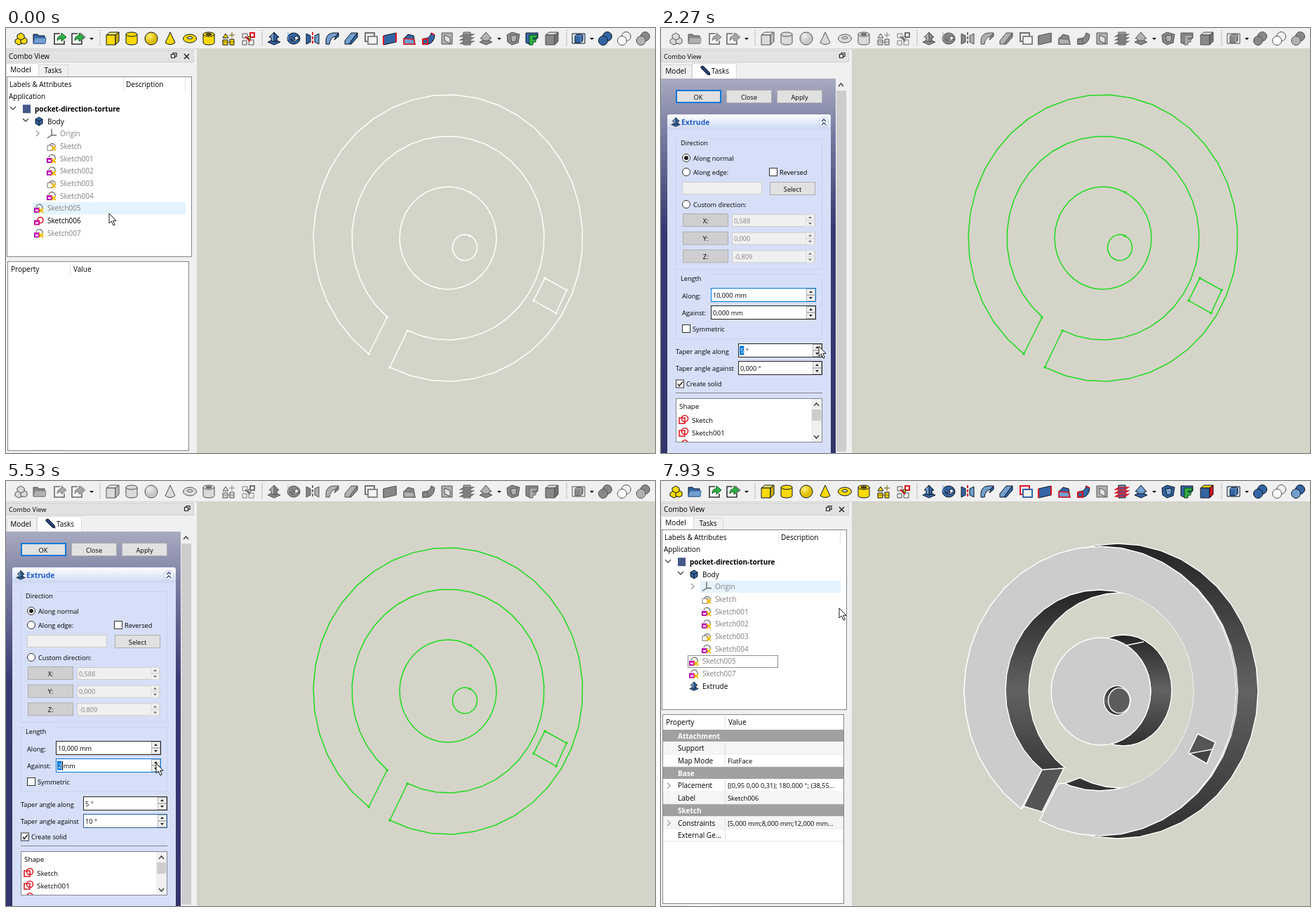
These frames come from a looping animation (925x605 px, 8 s). An HTML page:

```html
<!DOCTYPE html>
<html lang="en">
<head>
<meta charset="utf-8">
<title>Extrude a sketch</title>
<style>
html, body { margin: 0; width: 100%; height: 100%; overflow: hidden; background: #f0f0f0 }
svg { display: block; width: 925px; height: 605px; font: 10px "Open Sans", "Noto Sans", sans-serif }
#task { font-size: 9.2px }
.off, .idle .pick, .task .icon { filter: grayscale(1) opacity(.72) }
#task, #solid, .task #model, .idle #props, .done #sketch { display: none }
.task #task, .done #solid { display: inline }
#sketch { stroke: #1edb1e; fill: #1edb1e }
.idle #sketch { stroke: #fff; fill: #fff }
</style>
</head>
<body>
<script>
const INK = '#0b1521', BLUE = '#3465a4', SKY = '#729fcf', YELLOW = '#fcd909', RED = '#dd1520',
      GREEN = '#2fb344', GREY = '#808080', ACCENT = '#0078d7', VIEW = '#d5d4c8', TASK = '#d6dff7';

// Drawing helpers; all return SVG markup
const rect = (x, y, w, h, fill, line = 'none', extra = '') => {
  const o = line === 'none' ? 0 : .5;
  return `<rect x="${x + o}" y="${y + o}" width="${w - 2 * o}" height="${h - 2 * o}" fill="${fill}" stroke="${line}" ${extra}/>`;
};
const path = (d, fill = 'none', line = INK, extra = '') => `<path d="${d}" fill="${fill}" stroke="${line}" ${extra}/>`;
const oval = (x, y, rx, ry, fill = 'none', line = INK, extra = '') =>
  `<ellipse cx="${x}" cy="${y}" rx="${rx}" ry="${ry}" fill="${fill}" stroke="${line}" ${extra}/>`;
const text = (x, y, s, fill = '#000', extra = '') => `<text x="${x}" y="${y + 3.6}" fill="${fill}" ${extra}>${s}</text>`;
const at = (x, y, body, cls = '') => `<g transform="translate(${x} ${y})" class="${cls}">${body}</g>`;
const BOLD = 'font-weight="700"', MID = 'text-anchor="middle"';
const arc = (cx, cy, rx, ry, from = 0, to = 360, n = 40) => 'M' + Array.from({length: n + 1}, (_, i) => {
  const a = (from + (to - from) * i / n) * Math.PI / 180;
  return (cx + rx * Math.cos(a)).toFixed(1) + ' ' + (cy + ry * Math.sin(a)).toFixed(1);
}).join('L');

// Toolbar
const box = (top, front, side) => path('M-9-5L-4-9H9L4-5Z', top) + path('M-9-5H4V9H-9Z', front) + path('M4-5L9-9V4L4 9Z', side);
const tube = fill => path('M-8-6V6A8 3 0 0 0 8 6V-6', fill) + oval(0, -6, 8, 3, fill);
const slab = (y, fill) => path(`M-9 ${y}L0 ${y - 4}L9 ${y}L0 ${y + 4}Z`, fill);
const balls = (a, b) => oval(3, -3, 6.5, 6.5, b) + oval(-3, 3, 6.5, 6.5, a);
const share = path('M1-7H-7V8H7V3', '#fafafa', '#333', 'stroke-width="1.6"') +
  path('M-3 3Q-3-4 3-4V-8L10-2L3 4V0Q-1 0-3 3Z', GREEN, '#0c5a18');
const lift = slab(5, BLUE) + path('M-4 4V-2H-7L0-9L7-2H4V4Z', SKY) + path('M0-9L7-2H4V4H0Z', BLUE);
const drop = '<path d="M-3-1H3L0 2Z"/>';
const icons = [
  [21, path('M-8 2L-3-1L2 1V7L-3 9L-8 6Z', YELLOW) + path('M0 0L5-2L9 1V6L5 8L0 6Z', YELLOW) + path('M-5-5L0-8L5-5V0L0 2L-5-1Z', YELLOW)],
  [48, path('M-9-6H-3L-1-4H7V7H-9Z', BLUE) + path('M-7-1H9L8 7H-9Z', SKY, BLUE)],
  [76, share],
  [103, at(-2, 0, share) + path('M3-8L10-2L3 4', 'none', '#333')],
  [152, box('#fdf26a', YELLOW, '#cfae00')],
  [179, tube(YELLOW)],
  [207, oval(0, 0, 9, 9, 'url(#ball)')],
  [234, path('M0-9L-7 6Q0 11 7 6Z', YELLOW)],
  [262, oval(0, 0, 9.5, 6, YELLOW) + oval(0, -1, 4, 1.6, '#f0f0f0')],
  [289, tube(YELLOW) + oval(0, -6, 4, 1.2, '#6b5a00')],
  [317, path('M-8 9V2H-1V9ZM2 9V1H8V9ZM-8-1L-4-7L0-1Z', YELLOW) + path('M1-5H9M5-9V-1M-8 5H8', 'none', '#6b5a00')],
  [345, path('M-8-7H-1V-1H-8ZM1 2H8V9H1ZM-8 3H-2V9H-8Z', '#eee', '#555') + path('M3-8H9V-2H3ZM-4-3L3 4', 'none', RED, 'stroke-width="2"') + oval(2, -1, 2, 2, YELLOW)],
  [382, lift],
  [410, oval(0, 0, 9, 8, BLUE) + path('M-3-3A5 4 0 1 0 5 1L8 2L5-4L0-1L2 0A3 2 0 1 1-2-1Z', '#eef4fb') + path('M-8-9V2', 'none', SKY)],
  [437, path('M-9-7L-3-4V5L-9 8Z', BLUE) + path('M9-7L3-4V5L9 8Z', SKY) + path('M0-9V9', 'none', RED, 'stroke-width="2" stroke-dasharray="4 2"')],
  [465, path('M-9 8V2Q-8-7 1-8H9L5-3Q-3-2-4 8Z', SKY) + path('M5-3L9-8V-3L3 2Z', BLUE)],
  [492, path('M-9 8V3L0-8H9L5-3L-3 8Z', SKY) + path('M5-3L9-8V-2L0 8H-3Z', BLUE)],
  [520, path('M-8-8H5V4H-8Z', '#eee', RED, 'stroke-width="2"') + path('M-4-3H9V8H-4Z', '#f4f4f4', BLUE, 'stroke-width="2"'), 'pick'],
  [547, path('M-9-4L9-8V5L-9 9Z', BLUE) + path('M-9-4V9M9-8V5', 'none', RED, 'stroke-width="2"')],
  [575, path('M-8 8V0L-2-6L6-4L8 8Z', BLUE) + path('M-8 0L6 1L8 8H-8Z', SKY, RED, 'stroke-width="1.6"')],
  [602, path('M-8 8L-7 0Q2 1 4-8L9-5Q8 7-1 8Z', BLUE) + path('M-8 1H-1V8H-8ZM4-8L9-5', 'none', RED, 'stroke-width="2"')],
  [629, path('M-8-8H7V8H-8Z', SKY) + path('M-4-5L4-1V7L-4 3Z', '#ddd'), 'off'],
  [657, path('M-5-9H5V9H-5Z', SKY) + [-5, 0, 5].map(y => path(`M-9 ${y + 2}L-4 ${y - 1}H9L4 ${y + 2}Z`, BLUE, RED, 'stroke-width="1.5"')).join(''), 'pick'],
  [684, slab(5, BLUE) + path('M-5 3V0H-8L0-9L8 0H5V3Z', SKY), 'pick'],
  [723, path('M-9-5L-2-9L9-6L7 6L-2 9L-8 5Z', BLUE) + path('M-4-4L5-5L4 4L-2 5Z', SKY), 'pick'],
  [750, path('M-9-8H8V-1L-2 9L-9 6Z', BLUE) + path('M-4-5H7V-1H1V1H5V5H1V9H-4Z', GREEN, '#0a4214')],
  [778, box(YELLOW, BLUE, RED), 'pick'],
  [816, path('M-9-7H9V7H-9Z', '#dce8f5') + at(0, 0, path('M-5-4L-2-6H6V3L3 6H-5Z', BLUE) + path('M-5-4H3V6M3-4L6-6', 'none', SKY))],
  [854, balls(BLUE, BLUE)],
  [881, balls('#fff', '#eee'), 'off'],
  [908, balls(SKY, BLUE), 'pick'],
];
const toolbar = rect(0, 0, 925, 30, '#f0f0f0') + rect(0, 29, 925, 1, '#d0d0d0') + '<g id="hot"></g>' +
  [134, 365, 799].map(x => path(`M${x} 3V27`, 'none', '#aaa', 'stroke-dasharray="1 2" stroke-width="2"')).join('') +
  icons.map(([x, body, cls = '']) => at(x, 15, body, 'icon ' + cls)).join('') +
  [122, 703, 835].map(x => at(x, 15, drop)).join('');

// Model panel
const chevron = (x, y, open) => path(open ? `M${x - 4} ${y - 2}l4 4l4-4` : `M${x - 2} ${y - 4}l4 4l-4 4`, 'none', open ? '#444' : '#999', 'stroke-width="1.3"');
const cross = path('M0 0L6 6M6 0L0 6', 'none', '#f0b800', 'stroke-width="2"');
const sketchIcon = (kind, y) => ({
  plain: path('M-6-1H2V6H-6Z', '#fff', '#777') + path('M-3-1A4 4 0 1 1 5 2', 'none', '#777', 'stroke-width="1.4"') + cross,
  pink: path('M-4-2A4 4 0 0 1 5 0', 'none', '#777', 'stroke-width="1.4"') + rect(-7, -1, 8, 7, '#e615d8', '#8a0a84') + rect(-5, 2, 4, 2, '#fff') + cross,
  shown: oval(2, -1, 4, 4, 'none', RED, 'stroke-width="1.6"') + rect(-7, -1, 8, 7, '#e615d8', '#b00a60') + rect(-5, 2, 4, 2, '#fff'),
  axes: path('M0-7V2L-6 6M0 2H7', 'none', '#777', 'stroke-width="1.6"'),
  body: path('M-5-3L0-6L5-3V3L0 6L-5 3Z', BLUE) + path('M-5-3L0 0L5-3M0 0V6', 'none'),
  file: rect(-5, -6, 11, 12, '#46588a'),
  solid: at(0, 0, `<g transform="scale(.7)">${lift}</g>`),
})[kind];
const rowY = i => 97.5 + 17.7 * i;
const row = ([x, label, kind, color = GREY, extra = ''], i) =>
  text(x, rowY(i), label, color, extra) + (kind ? at(x - 12, rowY(i), sketchIcon(kind)) : '');
const head = [
  [4, 'Application', '', '#000'], [41, 'pocket-direction-torture', 'file', '#000', BOLD], [59, 'Body', 'body', '#000'],
  [77, 'Origin', 'axes'], [77, 'Sketch', 'plain'], [77, 'Sketch001', 'pink'], [77, 'Sketch002', 'pink'],
  [77, 'Sketch003', 'plain'], [77, 'Sketch004', 'pink'], [59, 'Sketch005', 'pink'],
];
const before = [...head, [59, 'Sketch006', 'shown', '#000'], [59, 'Sketch007', 'pink']];
const after = [...head, [59, 'Sketch007', 'pink'], [59, 'Extrude', 'solid', '#000']];
const tree = rows => rows.map(row).join('') + chevron(10, 114, 1) + chevron(28, 131, 1) + chevron(45, 150);

const props = [
  ['Attachment'], ['Support', ''], ['Map Mode', 'FlatFace'], ['Base'],
  ['Placement', '[(0,95 0,00 0,31); 180,000 °; (38,55...', 1], ['Label', 'Sketch006'], ['Sketch'],
  ['Constraints', '[5,000 mm;8,000 mm;12,000 mm...', 1], ['External Ge...', ''],
].map(([name, value, nested], i) => {
  const y = 354 + 17.7 * i;
  if (value === undefined) return rect(3, y, 257, 17, '#a0a0a0') + text(24, y + 9, name, '#fff', BOLD);
  return rect(3, y, 257, 17.7, i % 2 ? '#f5f5f5' : '#fff') + rect(3, y + 17, 257, .7, '#ddd') + rect(91, y, 1, 17.7, '#ddd') +
    text(24, y + 9, name) + text(95, y + 9, value, '#000', 'font-size="9.3"') + (nested ? chevron(11, y + 9) : '');
}).join('');

const panelTitle = rect(0, 31, 268, 18, '#e2e2e2', '#d0d0d0') + text(4, 40.5, 'Combo View');
const floatMark = x => path(`M${x - 1} 37.5v-2h5v5h-2M${x - 3.5} 37.5h5v5h-5z`, 'none', '#222', 'stroke-width="1.2"');
const model = rect(0, 30, 272, 575, '#f0f0f0') + panelTitle + floatMark(239) +
  path('M254 37L261 44M261 37L254 44', 'none', '#222', 'stroke-width="1.5"') +
  rect(46, 52, 43, 18, '#f0f0f0', '#d9d9d9') + rect(0, 50, 47, 21, '#fff', '#d9d9d9') +
  text(21, 59.5, 'Model', '#000', MID) + text(67, 60.5, 'Tasks', '#000', MID) +
  rect(1, 69, 264, 257, '#fff', '#828790') + rect(167, 70, 1, 20, '#e2e2e2') + rect(255, 70, 1, 20, '#e2e2e2') +
  text(5, 80.5, 'Labels &amp; Attributes') + text(171, 80.5, 'Description') + '<g id="hover"></g><g id="tree"></g>' +
  rect(2, 332, 259, 270, '#fff', '#828790') + rect(91, 334, 1, 19, '#e2e2e2') + text(7, 343.5, 'Property') + text(96, 343.5, 'Value') +
  `<g id="props">${props}</g>` + rect(40, 604, 42, 1, '#fff');

// Task panel
const button = (x, y, w, label, fill = '#e1e1e1') => rect(x, y, w, 19, fill, '#adadad') + text(x + w / 2, y + 10, label, '#000', MID);
const radio = (y, label, on) => oval(36, y, 5.5, 5.5, '#fff', '#333') + (on ? oval(36, y, 3, 3, '#222', 'none') : '') + text(46, y, label);
const check = (x, y, label, on) => rect(x, y - 6, 12, 12, '#fff', '#333') +
  (on ? path(`M${x + 3} ${y}l2 3l5-6`, 'none', '#222', 'stroke-width="1.4"') : '') + text(x + 15, y, label);
const group = (y, h, label) => rect(21, y, 209, h, 'none', '#c9d3ec') + rect(26, y, 44, 2, TASK) + text(28, y + 6, label);
const spin = (x, y, on) => [-1, 1].map(s =>
  rect(x, y + (s < 0 ? -9 : 0), 13, 9, '#f0f0f0', on ? '#b8b8b8' : '#ddd') +
  path(`M${x + 4} ${y + s * 3}h5l-2.5 ${s * 3}z`, on ? '#222' : '#777', 'none')).join('');
const field = (x, y, w, num, unit, selected, line) => rect(x, y - 10, w, 20, '#fff', line) + spin(x + w - 14, y, 1) +
  (selected ? rect(x + 2, y - 6.5, 1 + 5.3 * num.length, 13, ACCENT) : '') +
  text(x + 3, y, `<tspan fill="${selected ? '#fff' : '#000'}">${num}</tspan> ${unit}`);
const listIcon = y => at(32, y, oval(2, -1, 4.5, 4.5, 'none', RED, 'stroke-width="1.5"') + path('M-6-2H2V6H-6Z', 'none', RED, 'stroke-width="1.5"'));

const task = rect(0, 30, 272, 575, '#f0f0f0') + panelTitle + floatMark(258) +
  rect(1, 52, 43, 21, '#f0f0f0', '#d9d9d9') + rect(44, 50, 64, 23, '#fff', '#d9d9d9') +
  text(21, 61.5, 'Model', '#000', MID + ' font-size="10"') + text(72, 61, 'Tasks', '#000', 'font-size="10"') +
  path('M57 55L60 54L69 63L70 67L66 66L57 57Z', '#27406f', '#111d38') +
  rect(0, 72, 249, 533, 'url(#navy)') + rect(249, 72, 16, 533, '#f0f0f0') + rect(250, 89, 14, 514, '#cdcdcd') +
  path('M253 83l3.5-4l3.5 4', 'none', '#444', 'stroke-width="1.5"') +
  '<g id="ok"></g>' + button(93, 88, 65, 'Close') + button(165, 88, 65, 'Apply') +
  rect(9, 145, 233, 460, TASK) + path('M9 145V126Q9 123 12 123H239Q242 123 242 126V145Z', 'url(#caption)', 'none') +
  at(21, 134, `<g transform="scale(.7)">${lift}</g>`) + text(29, 134.5, 'Extrude', '#215dc6', BOLD + ' font-size="10.3"') +
  oval(232, 134, 6.5, 6.5, '#fff', '#b5c3e6') + path('M229 133l3-3l3 3M229 138l3-3l3 3', 'none', '#223a80', 'stroke-width="1.3"') +
  group(157, 187, 'Direction') + radio(185, 'Along normal', 1) + radio(205, 'Along edge:') + check(154, 205, 'Reversed') +
  rect(30, 219, 114, 18, '#f0f0f0', '#ccc') + button(155, 219, 65, 'Select') + radio(251, 'Custom direction:') +
  [['X:', '0,588'], ['Y:', '0,000'], ['Z:', '-0,809']].map(([axis, value], i) => {
    const y = 274 + 25.7 * i;
    return button(31, y - 10, 65, axis, '#cfcfd1') + rect(101, y - 9, 119, 18, '#f0f0f0', '#ccc') + spin(206, y, 0) + text(104, y, value, GREY);
  }).join('') +
  group(350, 93, 'Length') + text(30, 381, 'Along:') + text(30, 405.5, 'Against:') + check(30, 428, 'Symmetric') +
  text(21, 460, 'Taper angle along') + text(21, 484.5, 'Taper angle against') + check(21, 506.5, 'Create solid', 1) +
  '<g id="fields"></g>' + rect(21, 519, 209, 1, '#828790') + rect(21, 527, 209, 63, '#fff', '#828790') +
  text(26, 538.5, 'Shape', '#000', 'font-size="9.8"') +
  ['Sketch', 'Sketch001'].map((s, i) => listIcon(557 + 18 * i) + text(44, 558 + 18 * i, s, '#000', 'font-size="9.8"')).join('') +
  path('M30 589q4-5 8 0', 'none', RED, 'stroke-width="1.5"') +
  rect(214, 528, 15, 61, '#f0f0f0') + rect(215, 543, 13, 16, '#cdcdcd') +
  path('M218 538l3.5-4l3.5 4M218 580l3.5 4l3.5-4', 'none', '#444', 'stroke-width="1.5"');

// 3D view
const ends = [[517, 464], [547, 483], [543, 412], [572, 431], [768, 356], [799, 373], [784, 406], [752, 388], [662, 234], [661, 296]];
const sketch = `<g id="sketch" stroke-width="1.5"><path fill="none" d="${[
  arc(630, 299, 192, 204, 126, 475.6, 38), arc(630, 299, 137, 145, 129.2, 475, 38),
  arc(630, 299, 69, 73, -62, 298), arc(654, 312.5, 17.5, 18.5, -62, 298, 30),
  'M543 412L517 464M572 431L547 483M768 356L799 373L784 406L752 388Z'].join('')}"/>` +
  ends.map(([x, y]) => rect(x - 1.5, y - 1.5, 3, 3, 'inherit', 'none', 'style="fill:inherit"')).join('') + '</g>';

const wall = 'url(#wall)', face = '#ccc', inner = arc(625, 298, 134, 143);
const solid = '<g id="solid" stroke-width="1.4">' +
  path(arc(651, 299, 200, 210), wall, '#fff') + path(arc(627, 299, 195, 205), wall, '#fff') + path(arc(626, 299, 194, 206), face, '#fff') +
  path(inner, wall, '#fff') + `<g clip-path="url(#bore)">${path(arc(655, 298, 131, 139), VIEW, '#fff')}</g>` +
  path('M543 411L575 408L598 422L577 430L566 431L539 484L530 493L502 475L513 467Z', VIEW, 'none') +
  path('M598 422L577 430L566 431L539 484', 'none', '#fff') + path('M543 411L574 409L543 471L517 463Z', '#555', '#fff') + path('M543 411L513 467L517 463', 'none', '#fff') +
  path(arc(659, 298, 69, 79), wall, '#fff') + path(arc(628, 299, 70, 74), 'none', '#fff') + path(arc(627, 299.5, 71, 76.5), face, '#fff') +
  path('M663 234L688 229', 'none', '#fff') +
  path(arc(650, 312.5, 19, 21, 0, 360, 30), wall, '#fff') + path(arc(653, 312.5, 15.5, 18, 0, 360, 30), '#5c5c5c', '#fff') +
  path('M765 360L790 372L778 402L752 387Z', '#565656', '#fff') + path('M753 388L786 382L778 402Z', '#444', '#fff') + '</g>';

const gradient = (id, stops) => `<linearGradient id="${id}" x2="0" y2="1">${stops.map(([o, c]) => `<stop offset="${o}" stop-color="${c}"/>`).join('')}</linearGradient>`;
document.body.innerHTML = `<svg viewBox="0 0 925 605"><defs>
  ${gradient('wall', [[0, '#242424'], [.5, '#626262'], [1, '#303030']])}
  ${gradient('navy', [[0, '#a8aabf'], [.14, '#7b7da3'], [.4, '#383972'], [1, '#33346a']])}
  ${gradient('caption', [[0, '#fff'], [1, '#c9d6f3']])}
  <radialGradient id="ball" cx=".35" cy=".3"><stop stop-color="#fff27a"/><stop offset="1" stop-color="#e0bd00"/></radialGradient>
  <clipPath id="bore"><path d="${inner}"/></clipPath></defs>
  ${rect(272, 30, 653, 575, VIEW)}${sketch}${solid}
  <g id="model">${model}</g><g id="task">${task}</g>${toolbar}
  <path id="pointer" d="M0 0V14L3.3 11L6 17L8.3 16L5.7 10.3H10Z" fill="#fff" stroke="#000" stroke-width=".9"/></svg>`;

// Motion
const LOOP = 8000, PICK = 270, OPEN = 1270, DONE = 7460;
const moves = [
  [0, 147, 264], [70, 147, 264], [130, 149, 268], [260, 149, 268], [930, 380, 12], [1200, 380, 12], [1930, 225, 453],
  [2300, 225, 453], [2530, 230, 476], [2800, 224, 478], [3250, 224, 478], [3470, 221, 425], [3670, 215, 402],
  [3950, 213, 400], [4530, 197, 354], [4950, 185, 160], [5450, 214, 402], [5560, 214, 402], [6260, 52, 99],
  [7735, 52, 99], [7930, 254, 181], [8000, 254, 181],
];
const pointerAt = t => {
  const i = Math.max(1, moves.findIndex(m => m[0] >= t)), [a, b] = [moves[i - 1], moves[i]];
  const k = Math.max(0, Math.min(1, (t - a[0]) / (b[0] - a[0])));
  return [1, 2].map(n => a[n] + (b[n] - a[n]) * k);
};
const count = (t, start, step, max) => Math.max(0, Math.min(max, Math.floor((t - start) / step) + 1));
const number = (n, zero = '0,000') => n ? String(n) : zero;
const $ = id => document.getElementById(id);
const put = (id, html) => { if (put[id] !== html) $(id).innerHTML = put[id] = html; };

function draw(t) {
  const state = t < PICK ? 'idle' : t < OPEN ? 'sel' : t < DONE ? 'task' : 'done';
  const [x, y] = pointerAt(t);
  document.querySelector('svg').setAttribute('class', state);
  $('pointer').setAttribute('transform', `translate(${x} ${y})`);
  put('hot', state === 'sel' && x > 370 && y < 29 ? rect(369, 1, 28, 27, '#cce8ff', '#99d1ff') : '');

  // Row highlight trails the pointer slightly
  const rows = state === 'done' ? after : before, [hx, hy] = pointerAt(t - 60);
  const r = Math.floor((hy - 88.6) / 17.7);
  const bar = (i, color) => rect(rows[i][0] - 21, rowY(i) - 9, 277 - rows[i][0], 17.7, color);
  const focus = i => rect(38, Math.round(rowY(i) - 9), 129, 18, 'none', '#222', 'stroke-dasharray="1 1"');
  put('hover', (hx > 38 && hx < 256 && rows[r] && r > 0 ? bar(r, '#e5f3ff') : '') +
    (state === 'sel' ? bar(10, '#cce8ff') + focus(10) : state === 'done' ? focus(9) : ''));
  put('tree', tree(rows));

  const overOk = x > 21 && x < 86 && y > 88 && y < 107;
  put('ok', rect(21, 88, 65, 19, overOk ? '#e5f1fb' : '#e1e1e1', ACCENT) +
    (overOk ? '' : rect(22, 89, 63, 17, 'none', ACCENT)) + text(53, 98, 'OK', '#000', MID));

  const along = count(t, 2000, 67, 5), against = count(t, 2610, 65, 10), depth = t < 3870 ? 0 : t < 5500 ? 1 : 2;
  const caret = depth && t % 1060 < 530 ? rect(80, 399, 1, 13, '#000') : '';
  put('fields',
    field(71, 380, 150, '10,000', 'mm', 0, t < 2340 ? ACCENT : '#222') +
    field(71, 405, 150, number(depth), 'mm', depth, depth ? ACCENT : '#222') + caret +
    field(110, 459, 120, number(along), '°', along && !against, '#222') +
    field(110, 484, 120, number(against), '°', against && !depth, against ? '#2b5f94' : '#222'));
}
const tick = now => { draw(now % LOOP); requestAnimationFrame(tick); };
tick(0);
</script>
</body>
</html>
```
